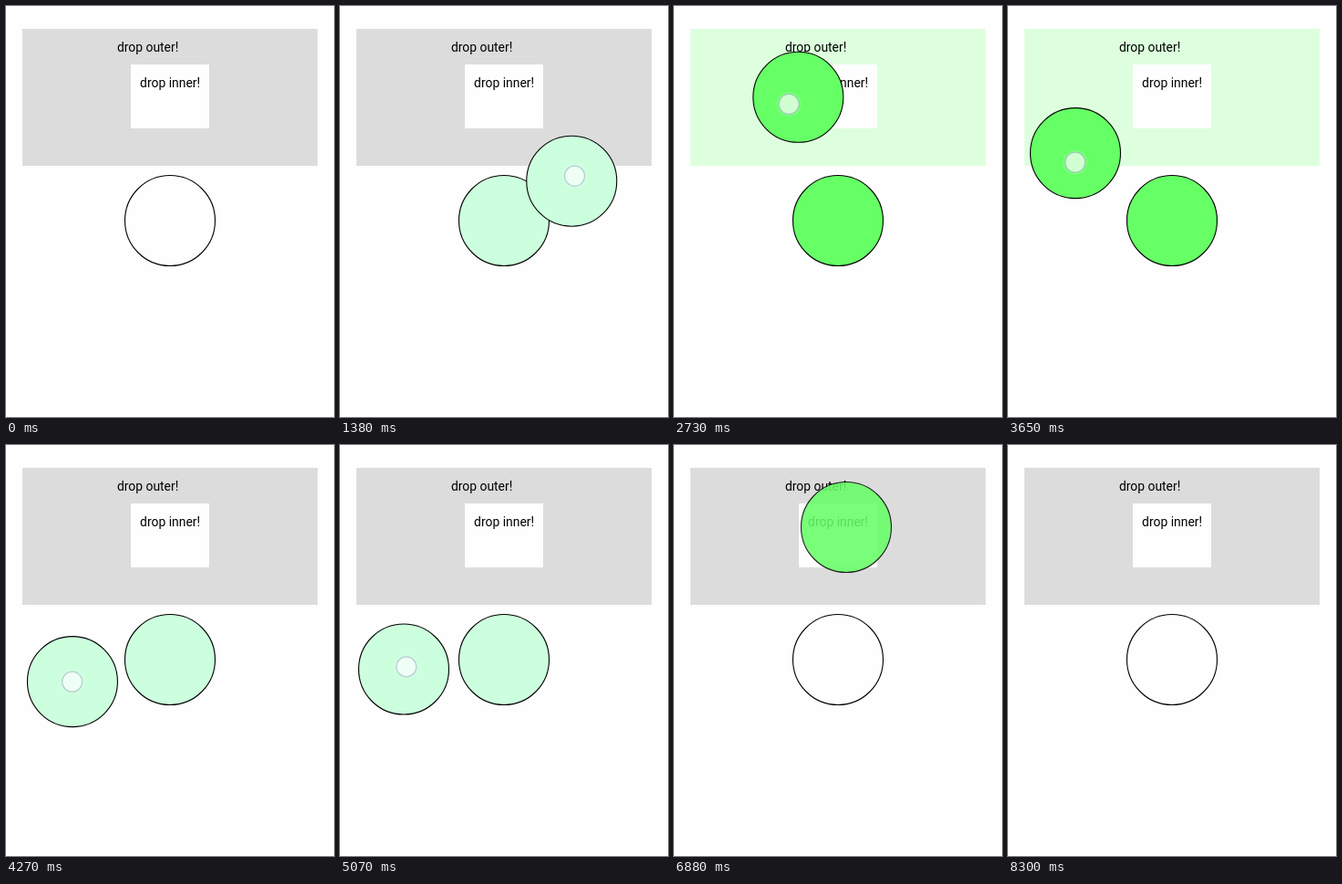
Write an HTML page that moves like this. It is 360 px wide and 450 px high and loops after 8.92 s.

```html
<!DOCTYPE html>
<html lang="en">
<head>
<meta charset="utf-8">
<title>Nested drop zones</title>
<style>
  html, body { margin: 0; width: 100%; height: 100%; overflow: hidden; background: #fefefe; }
  svg { display: block; width: 100vw; height: 100vh; }
  text { font: 13.9px Roboto, Arial, sans-serif; fill: #000; }
  .ball { stroke: #000; stroke-width: 1.1; }
</style>
</head>
<body>
<svg viewBox="0 0 360 450">
  <rect width="360" height="450" fill="#fefefe"/>
  <rect id="outer" x="18" y="25" width="324" height="150"/>
  <text x="121.9" y="50">drop outer!</text>
  <rect id="inner" x="137" y="64" width="86" height="70"/>
  <text x="147.1" y="89">drop inner!</text>
  <circle id="home" class="ball" cx="180" cy="235" r="49.5"/>
  <circle id="drag" class="ball" r="49.5"/>
  <g id="touch">
    <circle r="13.5" fill="#fff" opacity=".15"/>
    <circle r="11" fill="#fff" fill-opacity=".65" stroke="#8fa9bd" stroke-opacity=".55" stroke-width="1.3"/>
  </g>
</svg>
<script>
const LOOP = 8920, START = 270, DROP = 6540, FADE = 1510, LAG = 55;
const WHITE = '#fefefe', GREY = '#dcdcdc', HOVER = '#ddffdd', HELD = '#ccffdd', OVER = '#66ff66';

// Two sweeps of the finger with a rest between them
const sweeps = [
  [
    { t: 500, x: 180, y: 235 },
    { t: 1380, x: 254.2, y: 191.8 },
    { t: 2000, x: 267, y: 103.5 },
    { t: 2600, x: 160, y: 88 },
    { t: 3100, x: 80, y: 150 },
    { t: 3650, x: 74, y: 161 },
    { t: 4000, x: 74, y: 251 },
    { t: 5070, x: 70, y: 245.5 }
  ],
  [
    { t: 5070, x: 70, y: 245.5 },
    { t: 5550, x: 170, y: 148 },
    { t: 5800, x: 188.6, y: 122 },
    { t: 6300, x: 189, y: 90 }
  ]
];

const el = id => document.getElementById(id);
const outer = el('outer'), inner = el('inner'), home = el('home'), drag = el('drag'), touch = el('touch');
const clamp = u => Math.min(1, Math.max(0, u));
const smooth = u => u * u * (3 - 2 * u);

// Speed at a key point; every sweep starts and ends at rest
function speed(keys, i, axis) {
  const before = keys[i - 1], after = keys[i + 1];
  return before && after ? (after[axis] - before[axis]) / (after.t - before.t) : 0;
}

function position(t) {
  const keys = sweeps[t < sweeps[1][0].t ? 0 : 1];
  const next = keys.findIndex((key, i) => i > 0 && key.t > t);
  const i = (next < 0 ? keys.length - 1 : next) - 1;
  const a = keys[i], b = keys[i + 1], span = b.t - a.t, u = clamp((t - a.t) / span);
  const at = axis => a[axis] + (b[axis] - a[axis]) * smooth(u)
    + span * u * (1 - u) * ((1 - u) * speed(keys, i, axis) - u * speed(keys, i + 1, axis));
  return { x: at('x'), y: at('y') };
}

function contains(zone, { x, y }) {
  const { x: left, y: top, width, height } = zone.getBBox();
  return x > left && x < left + width && y > top && y < top + height;
}

function render(t) {
  const ball = position(t), finger = position(t + LAG);
  const dragging = t >= START && t < DROP;
  const zone = dragging ? [inner, outer].find(z => contains(z, ball)) : null;

  outer.setAttribute('fill', zone === outer ? HOVER : GREY);
  inner.setAttribute('fill', zone === inner ? HOVER : WHITE);
  home.setAttribute('fill', zone ? OVER : dragging ? HELD : WHITE);

  drag.setAttribute('cx', ball.x);
  drag.setAttribute('cy', ball.y);
  drag.setAttribute('fill', zone || t >= DROP ? OVER : HELD);
  drag.setAttribute('opacity', t < START ? 0 : 1 - smooth(clamp((t - DROP) / FADE)));

  // The ball trails slightly behind the finger
  touch.setAttribute('transform', `translate(${finger.x} ${finger.y})`);
  touch.setAttribute('opacity', dragging ? 1 : 0);
}

const begin = performance.now();
function tick() {
  render((performance.now() - begin) % LOOP);
  requestAnimationFrame(tick);
}
render(0);
requestAnimationFrame(tick);
</script>
</body>
</html>
```
